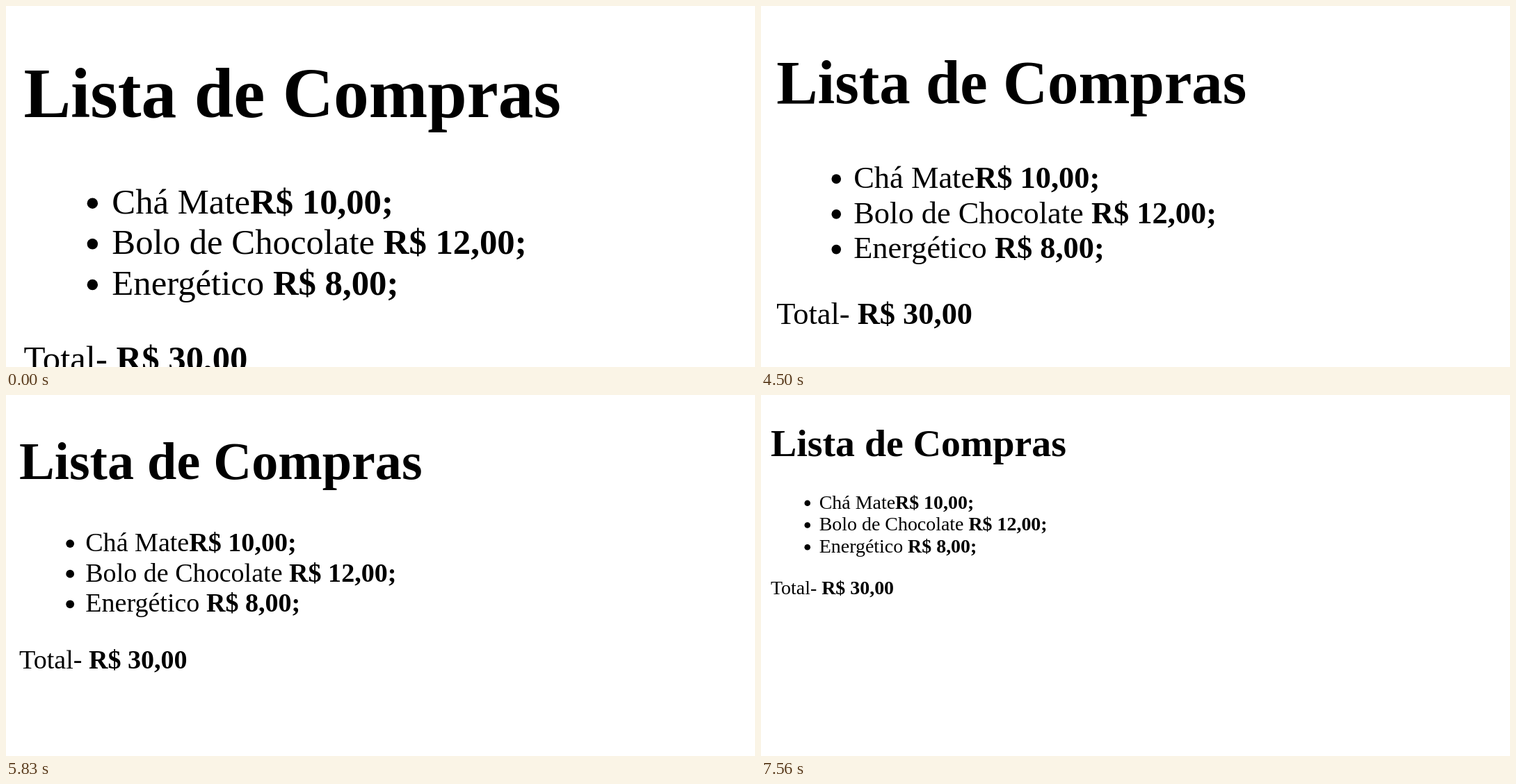
An HTML page with a canvas that plays this animation: 1077 by 520 pixels, repeating every 8 s.

```html
<!DOCTYPE html>
<html lang="pt-BR">
<head>
<meta charset="utf-8">
<title>Lista de Compras</title>
<style>
  html, body { margin: 0; width: 100%; height: 100%; overflow: hidden; background: #fff; }
  canvas { display: block; }
</style>
</head>
<body>
<canvas id="stage" width="1077" height="520"></canvas>
<script>
const ctx = document.getElementById('stage').getContext('2d');
const LOOP = 8000;
const SCREEN_SCALE = 0.7931;
const ZOOM_STEPS = [[0, 4], [4500, 3.5], [5240, 3], [6230, 2.5], [6890, 2.2]];
const ITEMS = [
  ['Chá Mate', 'R$ 10,00;'],
  ['Bolo de Chocolate ', 'R$ 12,00;'],
  ['Energético ', 'R$ 8,00;']
];

// Line metrics rounded to device pixels, as a browser does at each zoom.
function lineMetrics(size) {
  const ascent = Math.round(size * 0.891);
  const descent = Math.round(size * 0.216);
  const gap = Math.round(size * 0.0425);
  return { ascent, baseline: ascent + Math.floor(gap / 2), height: ascent + descent + gap };
}

function drawText(text, x, y, size, weight) {
  ctx.font = `${weight} ${size}px "Liberation Serif", "Times New Roman", serif`;
  ctx.fillText(text, x, y);
  return x + ctx.measureText(text).width;
}

function drawEntry([label, price], x, y, size) {
  drawText(price, drawText(label, x, y, size, 400), y, size, 700);
}

function drawBullet(x, baseline, ascent) {
  ctx.beginPath();
  ctx.arc(x - 0.53 * ascent - 5, baseline - 0.32 * ascent, (ascent * 2 / 3 + 1) / 4, 0, Math.PI * 2);
  ctx.fill();
}

function drawPage(zoom) {
  ctx.setTransform(1, 0, 0, 1, 0, 0);
  ctx.fillStyle = '#fff';
  ctx.fillRect(0, 0, 1077, 520);
  ctx.scale(SCREEN_SCALE, SCREEN_SCALE);
  ctx.fillStyle = '#000';

  const size = 16 * zoom, titleSize = 32 * zoom;
  const left = 8 * zoom, indent = 48 * zoom;
  const title = lineMetrics(titleSize), line = lineMetrics(size);
  const margin = titleSize * 0.67;

  drawText('Lista de Compras', left, margin + title.baseline, titleSize, 700);

  let y = margin * 2 + title.height + line.baseline;
  for (const item of ITEMS) {
    drawBullet(indent, y, line.ascent);
    drawEntry(item, indent, y, size);
    y += line.height;
  }
  drawEntry(['Total- ', 'R$ 30,00'], left, y + size, size);
}

let shownZoom;
function tick() {
  const time = performance.now() % LOOP;
  const zoom = ZOOM_STEPS.findLast(([start]) => time >= start)[1];
  if (zoom !== shownZoom) drawPage(shownZoom = zoom);
  requestAnimationFrame(tick);
}
tick();
</script>
</body>
</html>
```
